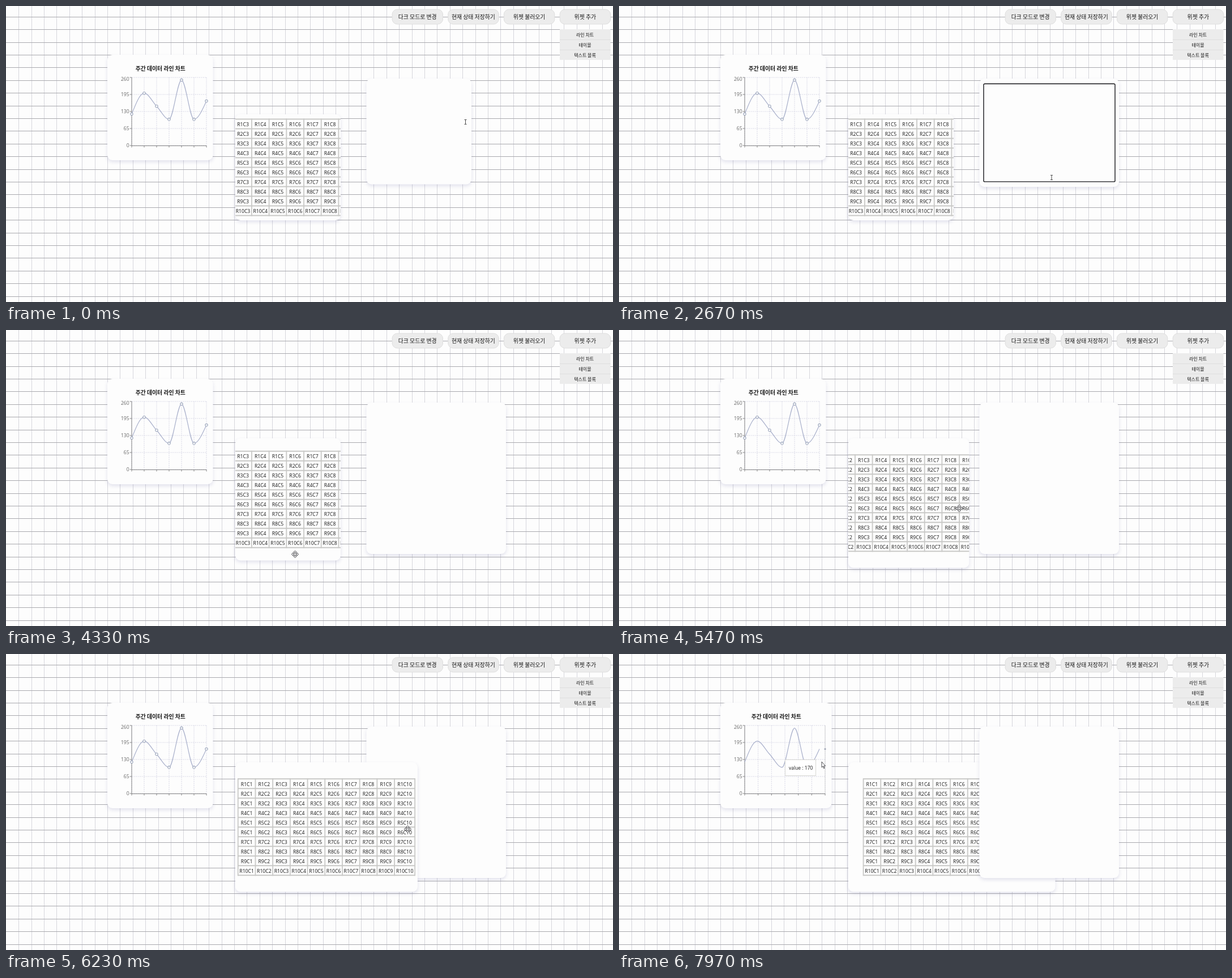
Recreate the animation shown at these times as an HTML page with a canvas. Size 1072 by 522 pixels, loop 8 s.

```html
<!DOCTYPE html>
<html lang="ko">
<head>
<meta charset="utf-8">
<title>Widget board</title>
<style>
html, body { margin: 0; width: 100%; height: 100%; overflow: hidden; background: #fdfdfd; }
canvas { display: block; }
</style>
</head>
<body>
<canvas id="stage" width="1072" height="522"></canvas>
<script>
const ctx = document.getElementById('stage').getContext('2d');
const LOOP = 8000;
const KOREAN = '"Noto Sans CJK KR", "Noto Sans CJK", sans-serif';
const LATIN = '"Open Sans", "Noto Sans", sans-serif';
const PAPER = '#fdfdfd';

const progress = (t, from, to) => Math.min(1, Math.max(0, (t - from) / (to - from)));
const glide = (t, from, to) => {
  const u = progress(t, from, to);
  return u * u * (3 - 2 * u);
};

// How far each widget edge has been dragged
const drags = {
  textRight: t => 61 * glide(t, 550, 1250),
  textBottom: t => 80.5 * glide(t, 2600, 3100),
  tableBottom: t => 41.5 * glide(t, 3880, 4600),
  tableRight: t => 179.5 * progress(t, 5200, 6500) ** 1.2,
  chartRight: t => 10 * progress(t, 7840, 7960)
};

// Pointer travel between drags: start, end, dx, dy
const moves = [
  [30, 800, -7, 14.5],
  [1500, 2000, -103.5, 99],
  [2430, 2600, 2, -20],
  [3300, 3640, -253.5, -11.5],
  [4800, 5150, 63, -94],
  [5470, 6470, 0, -6.5],
  [7170, 7700, -405, -118]
];

function layout(t) {
  const drag = {};
  for (const name in drags) drag[name] = drags[name](t);
  const pointer = {
    x: 811.5 + drag.textRight + drag.tableRight + drag.chartRight,
    y: 204.5 + drag.textBottom + drag.tableBottom
  };
  for (const [from, to, dx, dy] of moves) {
    const u = glide(t, from, to);
    pointer.x += dx * u;
    pointer.y += dy * u;
  }
  return {
    pointer,
    chart: { left: 179, top: 86, right: 365.5 + drag.chartRight, bottom: 272 },
    table: { left: 405, top: 191, right: 591 + drag.tableRight, bottom: 378 + drag.tableBottom },
    text: { left: 636.5, top: 128, right: 822 + drag.textRight, bottom: 314.5 + drag.textBottom },
    tableOnTop: t > 3880 && t < 7840
  };
}

const PLOT = { left: 222, top: 126, bottom: 246, gap: 22 };
const values = [120, 200, 150, 100, 250, 100, 170];
const valueX = i => PLOT.left + i * PLOT.gap;
const valueY = v => PLOT.bottom - v * 120 / 260;

// Monotone tangents, in value units per sample
const slopes = values.slice(1).map((v, i) => v - values[i]);
const tangents = values.map((v, i) => {
  const a = slopes[i - 1], b = slopes[i];
  return (Math.sign(a) + Math.sign(b)) * Math.min(Math.abs(a), Math.abs(b), Math.abs(a + b) / 4);
});
tangents[0] = (3 * slopes[0] - tangents[1]) / 2;
tangents[6] = (3 * slopes[5] - tangents[5]) / 2;

function traceValues() {
  ctx.beginPath();
  ctx.moveTo(valueX(0), valueY(values[0]));
  for (let i = 0; i < 6; i++) {
    ctx.bezierCurveTo(
      valueX(i + 1 / 3), valueY(values[i] + tangents[i] / 3),
      valueX(i + 2 / 3), valueY(values[i + 1] - tangents[i + 1] / 3),
      valueX(i + 1), valueY(values[i + 1]));
  }
  ctx.stroke();
}

function label(str, x, y, size, { font = LATIN, color = '#161616', align = 'center', weight = 400 } = {}) {
  ctx.font = `${weight} ${size}px ${font}`;
  ctx.fillStyle = color;
  ctx.textAlign = align;
  ctx.fillText(str, x, y + size * 0.36);
}

function line(x1, y1, x2, y2) {
  ctx.beginPath();
  ctx.moveTo(x1, y1);
  ctx.lineTo(x2, y2);
  ctx.stroke();
}

function pen(color, width = 1) {
  ctx.strokeStyle = color;
  ctx.lineWidth = width;
}

function roundRect({ left, top, right, bottom }, radius) {
  ctx.beginPath();
  ctx.roundRect(left, top, right - left, bottom - top, radius);
}

function dot(x, y, radius) {
  ctx.beginPath();
  ctx.arc(x, y, radius, 0, 7);
  ctx.fill();
}

function card(box) {
  ctx.save();
  ctx.shadowColor = 'rgba(80, 80, 150, 0.16)';
  ctx.shadowBlur = 6;
  ctx.shadowOffsetY = 3;
  ctx.fillStyle = PAPER;
  roundRect(box, 9);
  ctx.fill();
  ctx.restore();
}

function drawPaper() {
  ctx.fillStyle = PAPER;
  ctx.fillRect(0, 0, 1072, 522);
  ctx.fillStyle = '#d6d6dc';
  for (let x = 22.2; x < 1072; x += 22.4) ctx.fillRect(Math.round(x), 0, 1, 522);
  ctx.fillStyle = '#a9a9ae';
  for (let y = 18.8; y < 522; y += 22.4) ctx.fillRect(0, Math.round(y), 1072, 1);
}

function drawMenu() {
  pen('#dedede');
  ['다크 모드로 변경', '현재 상태 저장하기', '위젯 불러오기', '위젯 추가'].forEach((name, i) => {
    const left = 682 + i * 98.7;
    ctx.fillStyle = '#ececec';
    roundRect({ left, top: 6, right: left + 89.5, bottom: 32 }, 9);
    ctx.fill();
    ctx.stroke();
    label(name, left + 44.7, 19.5, 9.85, { font: KOREAN });
  });
  ctx.fillStyle = '#ececec';
  ctx.fillRect(978, 41, 89.5, 54);
  ['라인 차트', '테이블', '텍스트 블록'].forEach((name, i) => {
    const top = 41.5 + i * 18;
    if (i) line(978, top, 1067.5, top);
    label(name, 1022.5, top + 9.5, 8, { font: KOREAN });
  });
}

function drawChart(t, box) {
  const end = box.right - 11.5, step = (end - PLOT.left) / 6;
  const resized = t > 7840, hovered = t > 7720;
  card(box);
  label('주간 데이터 라인 차트', (box.left + box.right) / 2 + 0.5, 110.5, 9.83, { font: KOREAN, weight: 700 });

  pen('#d2d2e2', 0.9);
  ctx.setLineDash([2, 1.5]);
  for (let x = PLOT.left; x < end + 1; x += step) line(x, PLOT.top, x, PLOT.bottom);
  for (let y = PLOT.top; y <= PLOT.bottom; y += 30) line(PLOT.left, y, end, y);
  ctx.setLineDash([]);

  pen('#858585');
  line(PLOT.left, PLOT.top, PLOT.left, PLOT.bottom);
  line(PLOT.left, 246.5, end, 246.5);
  for (let x = PLOT.left; x < end + 1; x += step) line(x, 246, x, 249.5);
  for (let v = 0; v <= 260; v += 65) {
    const y = valueY(v);
    line(218.5, y, PLOT.left, y);
    label(v, 217.5, Math.max(y, 129), 8.5, { color: '#666', align: 'right' });
  }

  if (hovered) {
    pen('#ccc', 0.8);
    line(end, PLOT.top, end, PLOT.bottom);
  }
  pen('#a9b0cb', 1.2);
  traceValues();
  if (!resized) {
    pen('#9ea8bd', 1.1);
    ctx.fillStyle = '#fff';
    values.forEach((v, i) => {
      dot(valueX(i), valueY(v), 2.2);
      ctx.stroke();
    });
  }
  if (hovered) {
    ctx.fillStyle = '#a3a9b8';
    dot(end, valueY(170), 1.6);
    ctx.fillStyle = '#fff';
    ctx.fillRect(294, 186, 54, 28);
    pen('#d8d8d4');
    ctx.strokeRect(293.5, 186.5, 54, 28);
    label('value : 170', 300, 200.5, 8.5, { align: 'left' });
  }
}

function drawTable(t, box) {
  card(box);
  const pitch = 30.7, rowHeight = 17, width = 312.4, height = 170;
  const left = (box.left + box.right - width) / 2, top = (box.top + box.bottom - height) / 2;
  const colX = i => left + (i < 10 ? i * pitch : width);
  ctx.save();
  roundRect(box, 9);
  ctx.clip();
  pen('#c9c9c7', 1.8);
  for (let i = 0; i <= 10; i++) {
    line(colX(i), top - 0.9, colX(i), top + height + 0.9);
    line(left, top + i * rowHeight, left + width, top + i * rowHeight);
  }
  for (let r = 0; r < 10; r++) {
    for (let c = 0; c < 10; c++) {
      label(`R${r + 1}C${c + 1}`, (colX(c) + colX(c + 1)) / 2, top + r * rowHeight + 9.6, 8.6);
    }
  }
  ctx.restore();
}

function drawText(t, box) {
  card(box);
  if (t >= 1500 && t < 3900) {
    pen('#16161a', 1.4);
    roundRect({ left: 644, top: 137.2, right: box.right - 7, bottom: box.bottom - 9 }, 2);
    ctx.stroke();
  }
  if ((t >= 1500 && t < 2040) || (t >= 3330 && t < 3650)) {
    ctx.fillStyle = '#777';
    ctx.fillRect(645, 139, 1, 7);
  }
}

function drawBeam() {
  pen('#4c4c4c');
  line(0, -4, 0, 4);
  line(-2, -4, 2, -4);
  line(-2, 4, 2, 4);
}

function outline(points) {
  for (const [x, y] of points) ctx.lineTo(x, y);
}

function fillShape() {
  ctx.closePath();
  ctx.fillStyle = '#fff';
  ctx.fill();
  pen('#3c3c40', 0.9);
  ctx.stroke();
}

function drawMove() {
  ctx.beginPath();
  for (let i = 0; i < 4; i++) {
    outline([[-1, -1], [-1, -3.5], [-2.7, -3.5], [0, -6.3], [2.7, -3.5], [1, -3.5]]);
    ctx.rotate(Math.PI / 2);
  }
  fillShape();
}

function drawArrow() {
  ctx.beginPath();
  outline([[0, 0], [0, 10], [2.2, 8], [3.8, 11.8], [5.2, 11.2], [3.7, 7.6], [6.5, 7.4]]);
  fillShape();
}

function drawPointer({ pointer: { x, y }, text, table, tableOnTop }) {
  const over = box => x > box.left && x < box.right && y > box.top && y < box.bottom;
  ctx.save();
  ctx.translate(x, y);
  if (over(table) && (tableOnTop || !over(text))) drawMove();
  else if (over(text)) drawBeam();
  else drawArrow();
  ctx.restore();
}

function frame(now) {
  const t = now % LOOP;
  const scene = layout(t);
  drawPaper();
  drawMenu();
  drawChart(t, scene.chart);
  if (scene.tableOnTop) drawText(t, scene.text);
  drawTable(t, scene.table);
  if (!scene.tableOnTop) drawText(t, scene.text);
  drawPointer(scene);
  requestAnimationFrame(frame);
}
requestAnimationFrame(frame);
</script>
</body>
</html>
```
